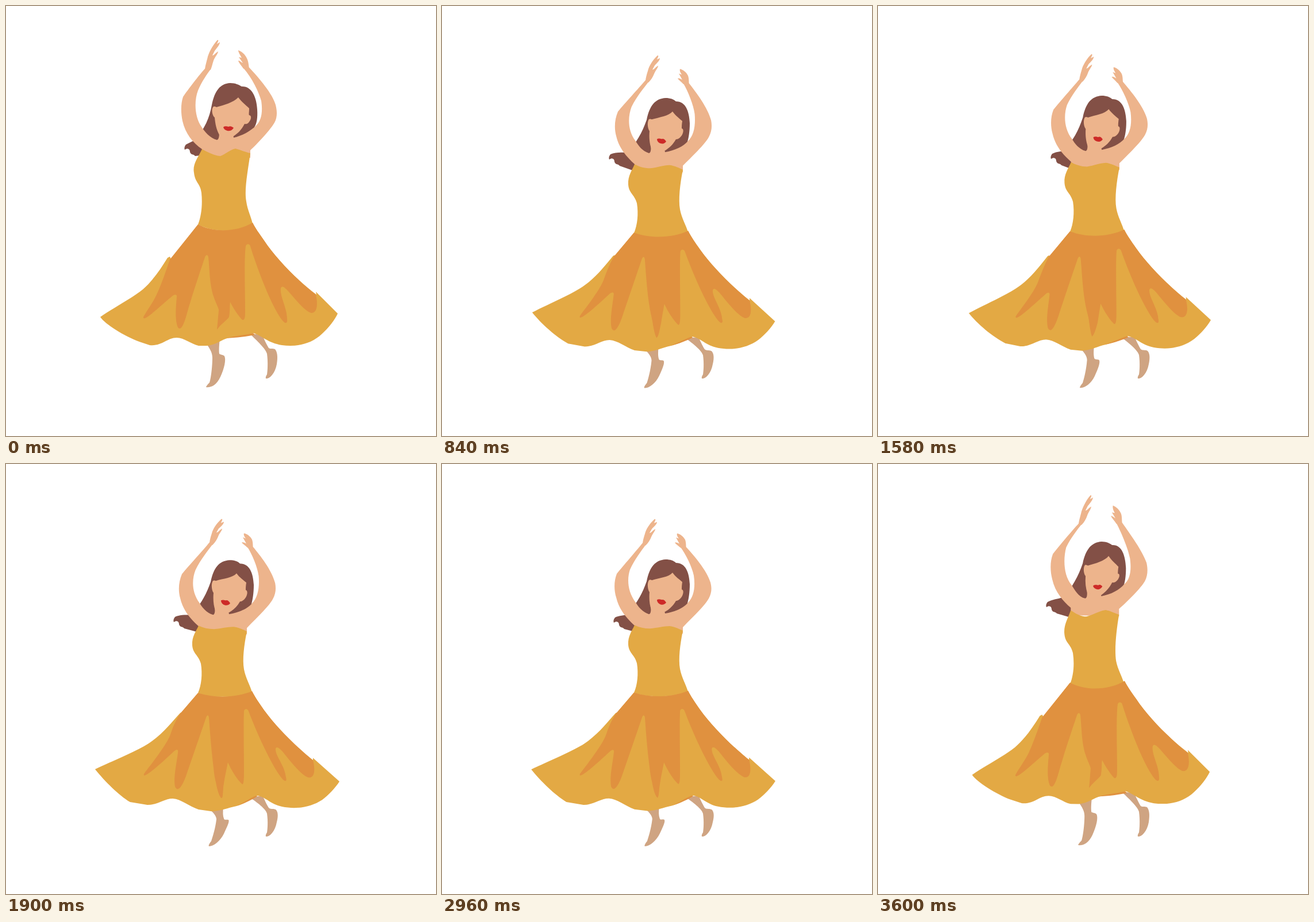
Write an HTML page that moves like this. It is 748x748 px and loops after 3.7 s.

```html
<!DOCTYPE html>
<html lang="en">
<head>
<meta charset="utf-8">
<title>Dancer</title>
<style>
html, body { margin: 0; width: 100%; height: 100%; overflow: hidden; background: #fff; }
svg { display: block; width: 100vw; height: 100vh; }
</style>
</head>
<body>
<svg id="stage" viewBox="0 0 748 748"></svg>
<script>
const LOOP = 3700;
const SKIN = '#edb48c', LEG = '#cfa482', HAIR = '#835046';
const GOLD = '#e3a944', ORANGE = '#e0913f', LIPS = '#cd2a28';

// time, drop, sway, hand lift, hand shift, hair tip x, hair tip y
const KEYS = [
  [0, 0, 0, 0, 0, 311, 248],
  [300, .42, .6, 0, 1, 306, 256],
  [600, 1, 1, 0, 2, 296, 274],
  [840, .79, 1, -3, 5, 291, 265],
  [1160, .1, .8, 0, 1, 296, 249],
  [1260, .06, .5, -3, 0, 303, 250],
  [1360, .05, .5, -6, 0, 306, 250],
  [1620, .75, .9, 0, 2, 300, 266],
  [1900, 1.01, 1, -2, 5, 292, 273],
  [2320, .22, .9, 0, 1, 294, 254],
  [2440, .1, .7, 0, 0, 298, 251],
  [2540, .12, .6, 2.5, -1, 301, 252],
  [2960, .97, 1, 0, 0, 299, 274],
  [3180, .8, 1, -1, 3, 292, 267],
  [3400, .22, 1, 0, 1, 292, 252],
  [3600, .03, .95, -6, 0, 293, 247]
];

// The picture holds for 100 ms, or 20 ms at these times
const SHORT = new Set([600, 820, 1140, 1560, 1680, 2300, 2320, 2840, 2960, 3380]);
const STEPS = [];
for (let t = 0; t < LOOP; t += SHORT.has(t) ? 20 : 100) STEPS.push(t);

// Each part: colour, mode, raised outline, lowered outline
const PARTS = [
  [HAIR, 'tuft'],
  [HAIR, 'body',
    'M390 134 C399 134 405 137 410 140 C427 139 436 158 437 180 C438 195 436 205 432 211 L436 215 L396 240 L345 250 L330 232 C346 212 354 195 358 172 C363 148 372 135 390 134Z',
    'M389 167 C397 167 403 169 407 173 C424 173 430 190 431 210 C431 225 429 236 427 243 L432 247 L390 270 L340 280 L322 262 C338 245 348 228 356 205 C361 180 371 168 389 167Z'],
  [SKIN, 'arm',
    'M346 109 C336 120 317 145 308 158 C304 170 304 185 307 200 C312 222 325 238 341 249 L341 262 L425 264 L425 251 C440 237 460 215 467 203 C473 192 471 180 469 172 C464 153 440 125 423 107 L413 108 C428 125 440 150 444 165 C447 185 444 200 435 208 C425 218 410 226 396 229 L394 218 L371 218 C371 228 370 232 367 233 C355 230 345 218 340 210 C328 193 327 165 334 147 C340 132 350 118 356 110Z',
    'M349 138 C338 152 315 178 304 192 C299 205 299 220 303 233 C308 255 322 270 335 282 L335 294 L419 296 L419 285 C435 268 457 248 464 235 C470 224 469 215 467 207 C460 185 438 160 425 146 L415 146 C424 158 435 180 438 195 C441 215 438 232 428 242 C420 252 405 258 388 261 L386 250 L363 250 C364 256 363 262 360 262 C348 258 342 250 337 242 C322 222 322 200 327 185 C335 167 347 152 354 142Z'],
  [SKIN, 'arm',
    'M346 110 C347 102 349 97 351 88 C354 78 362 65 368 59 C371 59 368 63 367 66 L372 63 C372 67 367 73 363 78 L359 86 C362 86 365 81 369 79 C369 83 363 89 361 95 C359 101 358 106 356 111Z',
    'M349 139 C350 131 352 126 354 119 C357 111 364 102 370 97 C373 97 370 101 369 104 L374 102 C374 106 369 110 365 114 L361 121 C364 121 367 116 371 114 C371 118 366 122 364 128 C362 133 359 138 354 143Z'],
  [SKIN, 'arm',
    'M413 109 C409 103 405 99 404 95 C407 95 409 98 412 99 L405 89 L410 90 C407 85 404 80 404 77 C410 79 416 84 419 91 C422 97 422 103 423 108Z',
    'M415 147 C411 143 407 141 405 138 C408 137 411 139 413 140 L407 129 L412 131 C409 127 408 124 409 122 C414 123 420 127 423 133 C425 139 424 143 425 147Z'],
  [SKIN, 'body',
    'M366 176 C380 172 395 168 404 159 C410 167 417 172 423 178 C423 184 422 188 423 190 C427 190 427 196 424 200 C421 205 418 206 415 205 C410 215 403 222 395 227 L371 224 C366 215 364 205 363 194 C358 190 357 178 361 175 C364 174 366 176 366 176Z',
    'M365 203 C378 199 394 198 401 190 C406 197 413 202 418 206 C417 212 417 216 417 219 C421 220 420 227 417 232 C413 238 409 239 407 239 C402 248 395 254 388 258 L364 254 C361 246 360 235 361 224 C357 218 357 207 360 203 C362 201 365 203 365 203Z'],
  [LIPS, 'body',
    'M378 211 C381 208 385 210 387 210 C390 208 394 210 396 212 C393 217 388 218 385 217 C381 216 379 214 378 211Z',
    'M374 237 C378 235 381 237 383 237 C386 236 388 239 390 242 C387 246 383 246 380 245 C377 244 374 241 374 237Z'],
  [LEG, 'skirt',
    'M349 588 C355 597 359 603 359 612 C359 630 356 650 354 655 C350 659 348 662 348 663 C355 664 366 661 373 645 C380 630 383 615 380 609 C377 606 373 607 371 605 C370 598 371 588 372 578Z',
    'M356 602 C362 608 366 613 366 618 C364 635 359 650 357 656 C353 661 352 664 353 665 C362 665 373 655 379 643 C385 630 389 622 387 619 C383 618 380 620 379 617 C377 612 377 605 378 598Z'],
  [LEG, 'skirt',
    'M424 570 C436 582 452 596 454 605 C456 620 455 635 454 641 C451 645 452 647 452 648 C458 649 468 640 471 623 C473 610 472 602 468 597 C464 595 460 597 457 595 C452 586 449 580 446 572Z',
    'M424 580 C436 588 452 600 454 608 C456 622 455 635 454 641 C451 645 452 647 452 648 C458 649 468 640 471 623 C474 612 473 604 469 601 C464 599 460 601 457 598 C452 590 450 584 446 577Z'],
  [GOLD, 'bust',
    'M341 249 C352 255 365 261 373 261 C383 257 390 250 399 248 C408 250 418 255 425 256 C421 285 414 320 418 340 C420 355 427 368 429 379 C400 394 360 394 334 380 C340 365 342 345 340 325 C338 308 329 308 327 290 C324 275 335 262 341 249Z',
    'M335 281 C343 285 352 287 362 287 C375 286 385 283 396 283 C405 284 413 288 419 291 C414 315 411 340 414 357 C417 373 425 385 428 397 C400 406 360 408 334 398 C340 385 342 365 339 347 C335 332 325 330 324 315 C323 300 331 290 335 281Z'],
  [GOLD, 'skirt',
    'M334 380 L287 440 L285 436 L281 438 C268 459 256 477 238 493 C215 511 185 526 164 541 C172 553 205 574 232 584 L250 590 C272 592 280 577 297 577 C310 577 322 588 335 591 L349 591 C365 590 375 580 388 577 C405 575 420 575 430 569 C445 573 455 586 480 590 C505 593 530 589 550 570 C562 559 572 546 577 535 L539 497 L540 502 C510 480 470 440 449 408 C440 395 434 387 429 377 C400 394 360 394 334 380Z',
    'M334 398 L305 432 L303 433 L302 434 C288 449 269 475 240 491 C215 505 180 519 155 531 C172 552 196 576 216 588 L246 593 C265 593 275 582 290 582 C305 583 318 595 335 601 L358 604 C375 603 385 598 400 595 C415 591 428 583 437 577 C450 578 460 592 480 596 C505 601 530 597 550 584 C562 575 573 563 580 552 L534 511 L534 515 C505 492 470 457 449 428 C440 415 433 405 428 395 C400 406 365 408 334 398Z'],
  [ORANGE, 'skirt',
    'M334 380 L285 441 C277 465 268 490 262 502 C255 517 243 533 239 541 C238 552 270 520 290 504 C294 501 298 502 297 506 C296 520 293 545 299 559 C306 568 312 545 317 527 C325 500 340 455 346 437 C348 432 351 432 352 437 C354 455 354 485 361 505 C366 520 371 527 370 530 C369 540 368 553 367 563 C374 553 385 546 388 541 C390 530 389 520 390 515 C396 527 405 540 411 546 C416 547 416 540 416 530 C416 500 414 440 417 418 C418 413 424 413 425 418 C435 450 460 520 480 546 C486 554 490 552 489 545 C489 525 476 505 478 491 C480 485 485 490 490 495 C505 512 520 531 531 534 C543 534 542 515 539 502 C510 480 470 440 449 408 C440 395 434 387 429 377 C400 394 360 394 334 380Z',
    'M334 398 L303 434 C292 450 288 465 285 473 C275 495 250 525 240 539 C236 552 275 516 293 499 C297 496 300 496 299 502 C297 520 291 545 294 561 C300 575 310 552 314 540 C325 508 340 465 348 441 C350 436 352 436 353 441 C355 470 358 505 361 528 C362 538 363 545 365 553 C368 570 372 580 375 581 C378 581 377 566 379 556 C381 542 384 530 386 519 C392 533 403 550 411 557 C414 558 414 545 414 535 C414 505 413 450 414 430 C415 425 420 425 422 430 C435 465 462 525 480 547 C486 554 489 552 487 545 C485 525 470 510 469 497 C469 489 476 494 481 500 C497 520 512 539 525 545 C538 548 538 530 534 515 C505 492 470 457 449 428 C440 415 433 405 428 395 C400 406 365 408 334 398Z'],
  [ORANGE, 'skirt',
    'M383 578 C400 573 420 572 430 569 L433 572 C420 575 400 577 383 578Z',
    'M400 595 C415 589 425 580 435 577 L437 578 C430 583 415 590 400 595Z']
];

const stage = document.getElementById('stage');
const numbers = s => s.match(/\d+/g).map(Number);
const mix = (a, b, k) => a + (b - a) * k;

const parts = PARTS.map(([fill, mode, up, down]) => {
  const node = document.createElementNS(stage.namespaceURI, 'path');
  node.setAttribute('fill', fill);
  stage.appendChild(node);
  return { node, mode, up, from: up && numbers(up), to: down && numbers(down) };
});

function key(i) {
  const n = KEYS.length, turn = Math.floor(i / n), k = KEYS[i - turn * n].slice();
  k[0] += turn * LOOP;
  return k;
}

// Smooth cyclic curve through the keys
function poseAt(t) {
  let i = KEYS.length - 1;
  while (KEYS[i][0] > t) i--;
  const [p, a, b, q] = [i - 1, i, i + 1, i + 2].map(key);
  const span = b[0] - a[0], u = (t - a[0]) / span, u2 = u * u, u3 = u2 * u;
  return a.map((v, c) => {
    const m = (b[c] - p[c]) / (b[0] - p[0]) * span;
    const n = (q[c] - v) / (q[0] - a[0]) * span;
    return (2 * u3 - 3 * u2 + 1) * v + (u3 - 2 * u2 + u) * m + (3 * u2 - 2 * u3) * b[c] + (u3 - u2) * n;
  });
}

function tuft(x, y, drop, sway) {
  const r = 222 + 35 * drop;
  return `M345 ${r} C335 ${r + 9} ${x + 16} ${y - 14} ${x + 2} ${y - 7}
    C${x - 1} ${y - 3} ${x - 1} ${y} ${x} ${y + 2} C${x + 6} ${y - 2} ${x + 9} ${y + 2} ${x + 9} ${y + 6}
    C${x + 11} ${y + 12} ${x + 15} ${y + 9} ${x + 18} ${y + 13}
    L${338 - 5 * sway} ${260 + 26 * drop + 6 * sway} L350 ${r + 25}Z`;
}

function outline(part, drop, sway, lift, shift) {
  const { mode, up, from, to } = part;
  const kx = mode === 'skirt' ? drop : sway;
  const ky = mode === 'bust' ? drop + .15 * sway * (1 - drop) : drop;
  let i = 0;
  return up.replace(/\d+/g, () => {
    const n = i++, isX = n % 2 === 0;
    let v = mix(from[n], to[n], isX ? kx : ky);
    if (mode === 'arm') {
      const y = from[isX ? n + 1 : n];
      v += (isX ? shift : lift) * Math.max(0, Math.min(1, (190 - y) / 80));
    }
    return v.toFixed(2);
  });
}

function draw(t) {
  const [, drop, sway, lift, shift, x, y] = poseAt(t);
  for (const part of parts) {
    part.node.setAttribute('d', part.mode === 'tuft'
      ? tuft(x, y, drop, sway)
      : outline(part, drop, sway, lift, shift));
  }
}

const start = performance.now();
function tick() {
  const t = (performance.now() - start) % LOOP;
  draw(STEPS.findLast(s => s <= t));
  requestAnimationFrame(tick);
}
tick();
</script>
</body>
</html>
```
